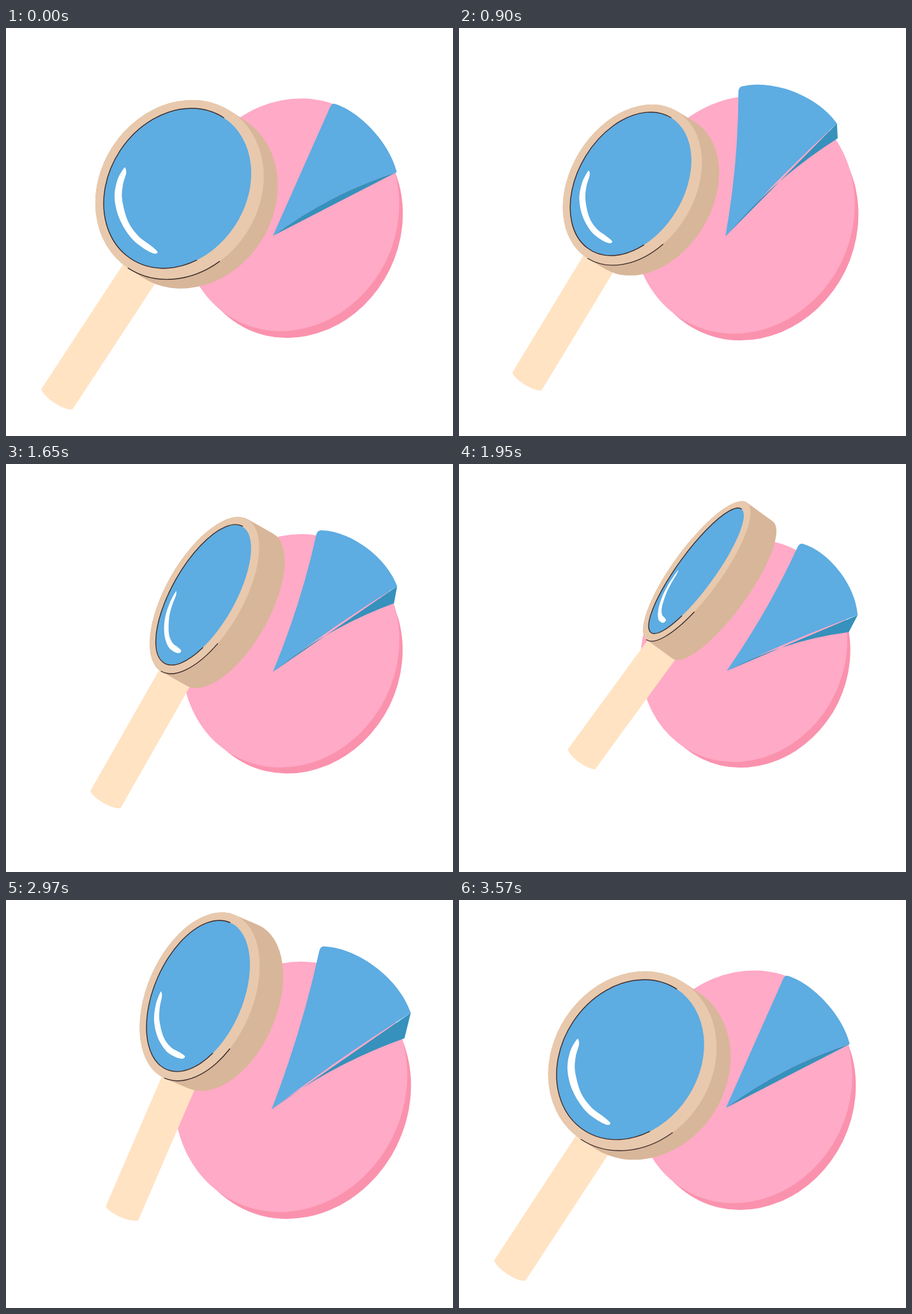
An HTML page that plays this animation: 700x640 px, repeating every 3.6 s.

```html
<!DOCTYPE html>
<html lang="en">
<head>
<meta charset="utf-8">
<title>Magnifier and pie chart</title>
<style>
html, body { margin: 0; width: 100%; height: 100%; overflow: hidden; background: #fff; }
svg { display: block; width: 700px; height: 640px; }
.line { fill: none; stroke: #3b2b2b; stroke-width: 1.4; stroke-linecap: round; }
</style>
</head>
<body>
<svg viewBox="0 0 700 640">
  <path id="base" fill="#fa92ae"/>
  <path id="disc" fill="#ffaac6"/>
  <path id="wall" fill="#3691bc"/>
  <path id="slice" fill="#5dace2"/>
  <g id="glass">
    <path id="handle" fill="#ffe3c3"/>
    <path id="side" fill="#d8b699"/>
    <path id="rim" fill="#e8c9ad"/>
    <path id="lens" fill="#5dace2"/>
    <path id="shine" fill="#fff"/>
    <path id="lensLine" class="line"/>
    <path id="rimLine" class="line"/>
  </g>
</svg>
<script>
const LOOP = 3600, STEP = 30;

// time, centre x, centre y, half length, half width, tilt, depth, handle offset
const GLASS = [
  [0, 268.5, 251.5, 132.4, 107.5, 33.2, 26.3, 23.2],
  [540, 273, 251, 123, 86, 31.5, 31, 21.6],
  [900, 269, 244.5, 121.6, 83, 31.2, 31.4, 21.5],
  [1080, 260, 192, 125, 75, 26.5, 38, 22.5],
  [1380, 260, 177.5, 126.3, 71.8, 24.8, 40.3, 23],
  [1620, 303, 206, 124, 52, 29, 45, 25],
  [1950, 371.5, 167.5, 120, 29, 36.1, 50.2, 29],
  [2430, 361.5, 169, 120, 41, 35.3, 47.4, 27.8],
  [2700, 309, 156, 124, 60, 27, 43, 26.5],
  [2970, 301, 150.5, 125.5, 69.7, 23.3, 40, 25.3],
  [3240, 292, 160, 126, 76, 25, 38, 25],
  [3570, 268.3, 250.4, 132.4, 107.5, 33.2, 26.3, 23.2],
  [3600, 268.5, 251.5, 132.4, 107.5, 33.2, 26.3, 23.2]
];

// time, scale, then angle and radius of the slice's corner, tip and foot
const PIE = [
  [0, 1, 23.9, 228, 62.7, 218.3, 62.7, 218.3],
  [540, 1, 9, 229, 48.5, 241, 52, 230],
  [900, 1.026, 5.1, 235, 44.6, 248.6, 48.8, 233.6],
  [1110, 1.046, 3, 236, 42.4, 252.5, 46.6, 238],
  [1380, 1.041, 2.2, 236.5, 41.6, 253.2, 45.8, 238.7],
  [1620, 1.005, 16, 233, 54, 238, 59, 220],
  [1950, 0.953, 29.7, 231, 66.9, 222.9, 72.4, 200.4],
  [2430, 0.995, 25, 239, 62.5, 236, 68.4, 212.2],
  [2700, 1.03, 21, 254, 59, 245, 65, 223],
  [2970, 1.073, 16.7, 267, 55.2, 265.4, 61.8, 236],
  [3240, 1.01, 22.5, 234, 61.3, 226, 63, 222],
  [3570, 1, 23.9, 228, 62.7, 218.3, 62.7, 218.3],
  [3600, 1, 23.9, 228, 62.7, 218.3, 62.7, 218.3]
];

// highlight outline in units of the lens half axes
const SHINE = [
  [-.814, .15], [-.795, .318], [-.683, .51], [-.458, .68], [-.17, .79],
  [.072, .814], [.235, .798], [.26, .757], [.112, .739], [-.1, .725],
  [-.342, .646], [-.58, .474], [-.689, .325], [-.742, .19], [-.785, .143]
];

const $ = id => document.getElementById(id);
const RAD = Math.PI / 180;
const put = (id, d) => $(id).setAttribute('d', d);
const pt = p => p[0].toFixed(2) + ' ' + p[1].toFixed(2);
const mix = (p, q, k) => [p[0] + (q[0] - p[0]) * k, p[1] + (q[1] - p[1]) * k];
const dist = (p, q) => Math.hypot(q[0] - p[0], q[1] - p[1]);
const toward = (p, q, d) => mix(p, q, d / dist(p, q));

// point at fraction k of p-q, pushed d to the left of the direction of travel
function beside(p, q, k, d) {
  const m = mix(p, q, k), n = dist(p, q);
  return [m[0] + (q[1] - p[1]) / n * d, m[1] - (q[0] - p[0]) / n * d];
}

// monotone cubic interpolation of one column; the keys wrap around the loop
function sample(keys, t) {
  let i = 0;
  const n = keys.length - 1;
  while (i < n - 1 && t >= keys[i + 1][0]) i++;
  const slope = (j, c) => {
    const k = (j + n) % n;
    return (keys[k + 1][c] - keys[k][c]) / (keys[k + 1][0] - keys[k][0]);
  };
  const tangent = (j, c) => {
    const a = slope(j - 1, c), b = slope(j, c);
    return a * b > 0 ? 2 * a * b / (a + b) : 0;
  };
  const h = keys[i + 1][0] - keys[i][0], u = (t - keys[i][0]) / h, v = 1 - u;
  return keys[i].slice(1).map((p, k) => {
    const c = k + 1, q = keys[i + 1][c];
    return p * (1 + 2 * u) * v * v + q * u * u * (3 - 2 * u)
      + h * u * v * (tangent(i, c) * v - tangent(i + 1, c) * u);
  });
}

// arc from angle f to angle g, in degrees, on an upright ellipse
function arc(cx, rx, ry, f, g) {
  const at = d => pt([cx + rx * Math.cos(d * RAD), ry * Math.sin(d * RAD)]);
  return `M${at(f)}A${rx} ${ry} 0 ${Math.abs(g - f) > 180 ? 1 : 0} ${g > f ? 1 : 0} ${at(g)}`;
}

function oval(cx, cy, rx, ry, tilt) {
  const dx = rx * Math.cos(tilt * RAD), dy = rx * Math.sin(tilt * RAD);
  const half = s => `A${rx} ${ry} ${tilt} 0 1 ${pt([cx + s * dx, cy + s * dy])}`;
  return `M${pt([cx - dx, cy - dy])}${half(1)}${half(-1)}Z`;
}

function smoothLoop(p) {
  const n = p.length, at = i => p[(i + n) % n];
  let d = 'M' + pt(p[0]);
  for (let i = 0; i < n; i++) {
    const [a, b, c, e] = [at(i - 1), at(i), at(i + 1), at(i + 2)];
    const c1 = [b[0] + (c[0] - a[0]) / 6, b[1] + (c[1] - a[1]) / 6];
    const c2 = [c[0] - (e[0] - b[0]) / 6, c[1] - (e[1] - b[1]) / 6];
    d += `C${pt(c1)} ${pt(c2)} ${pt(c)}`;
  }
  return d + 'Z';
}

function drawGlass(t) {
  const [x, y, a, b, tilt, depth, grip] = sample(GLASS, t);
  const ra = a * 1.11, rb = b * 1.11 + 5.5, rx = b * .036;
  const w = a * .2205, end = a * 2.872, bulge = end + a * .068;
  const l = grip - w, r = grip + w, back = rx + depth;

  $('glass').setAttribute('transform', `translate(${x} ${y}) rotate(${tilt})`);
  put('handle', `M${l} ${a}L${l} ${end}C${l + w * .35} ${bulge} ${r - w * .35} ${bulge} ${r} ${end}L${r} ${a}Z`);
  put('side', `M${rx} ${-ra}L${back} ${-ra}A${rb} ${ra} 0 0 1 ${back} ${ra}L${rx} ${ra}A${rb} ${ra} 0 0 1 ${rx} ${-ra}Z`);
  put('rim', oval(rx, 0, rb, ra, 0));
  put('lens', oval(0, 0, b, a, 0));
  put('shine', smoothLoop(SHINE.map(p => [p[0] * b, p[1] * a])));
  put('lensLine', arc(0, b, a, 36, 270));
  put('rimLine', arc(rx, rb, ra, 90, 24));
}

function drawPie(t) {
  const [s, ca, cr, ta, tr, fa, fr] = sample(PIE, t);
  const cx = 446, cy = 293;
  put('disc', oval(cx, cy, 165.8 * s, 186.9 * s, 26));
  put('base', oval(cx + 10 * s, cy + 15 * s, 161.3 * s, 181.9 * s, 26));

  const apex = [cx - 28 * s, cy + 33 * s];
  const polar = (d, r) => [apex[0] + r * Math.sin(d * RAD), apex[1] - r * Math.cos(d * RAD)];
  const corner = polar(ca, cr), tip = polar(ta, tr), foot = polar(fa, fr);
  const lift = Math.min(1, Math.abs(tr - fr) / 15);
  const chord = dist(corner, tip), sag = chord * (.115 + .025 * lift) * 4 / 3;
  const c1 = beside(corner, tip, .27, sag), c2 = beside(corner, tip, .73, sag);
  const left = beside(apex, corner, .5, -10 * lift);
  const right = beside(tip, apex, .5, -18 + 12 * lift);
  const low = beside(foot, apex, .5, -18);

  put('wall', `M${pt(apex)}L${pt(tip)}L${pt(foot)}Q${pt(low)} ${pt(apex)}Z`);
  put('slice', `M${pt(apex)}Q${pt(left)} ${pt(toward(corner, apex, 7))}`
    + `Q${pt(corner)} ${pt(toward(corner, c1, 5))}`
    + `C${pt(c1)} ${pt(c2)} ${pt(tip)}Q${pt(right)} ${pt(apex)}Z`);
}

let start = null;
function frame(now) {
  if (start === null) start = now;
  const t = Math.floor(((now - start) % LOOP) / STEP) * STEP;
  drawPie(t);
  drawGlass(t);
  requestAnimationFrame(frame);
}
drawPie(0);
drawGlass(0);
requestAnimationFrame(frame);
</script>
</body>
</html>
```
